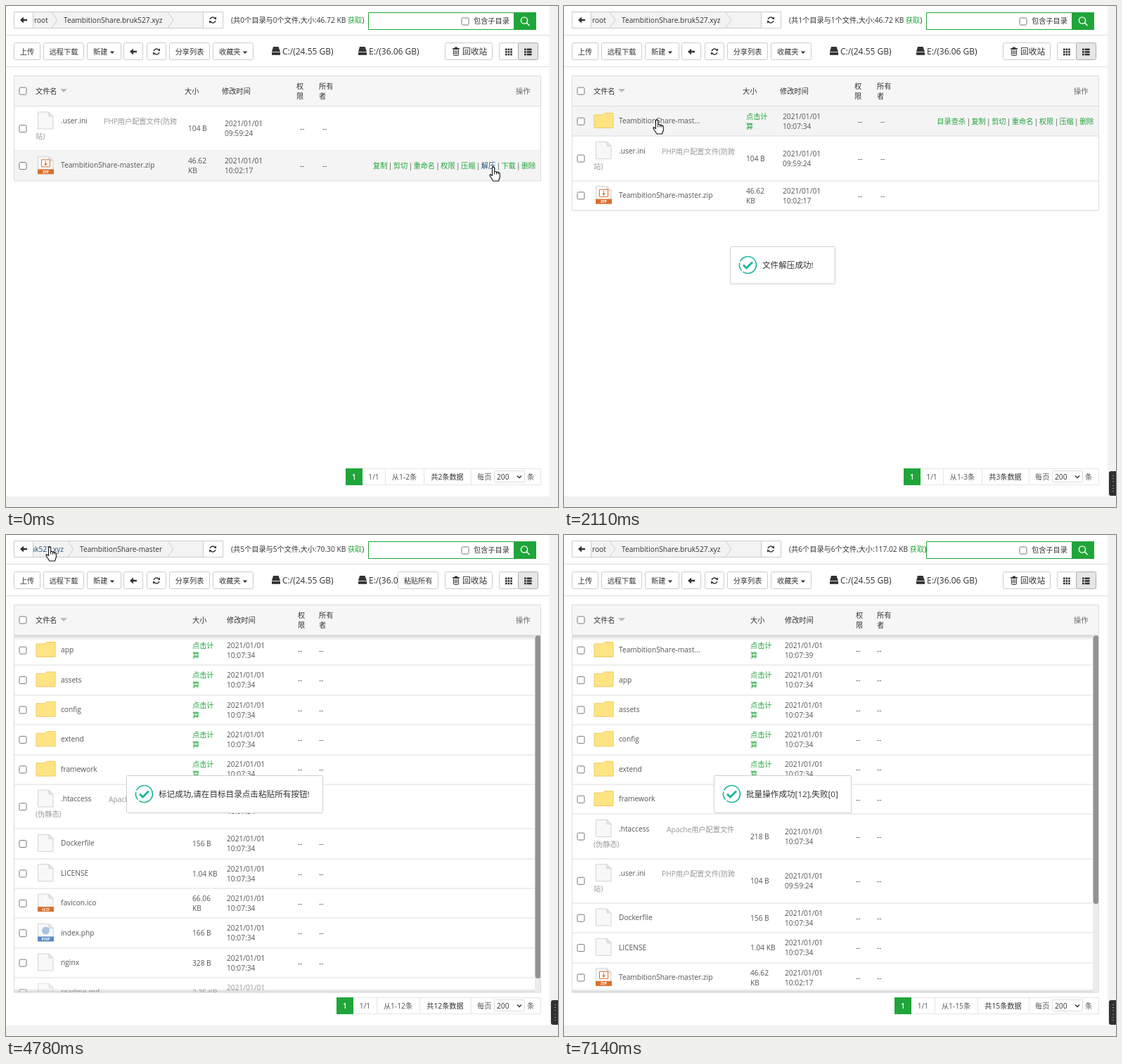
Recreate the animation shown at these times as an HTML page with a canvas. Size 785 px wide and 713 px high, loop 7.7 s.

```html
<!DOCTYPE html>
<html lang="zh">
<head>
<meta charset="utf-8">
<title>File manager</title>
<style>
html, body { margin: 0; width: 100%; height: 100%; overflow: hidden; background: #fff; }
canvas { display: block; width: 785px; height: 713px; }
</style>
</head>
<body>
<canvas id="stage" width="785" height="713"></canvas>
<script>
const ctx = document.getElementById('stage').getContext('2d');
const LOOP = 7700;
const GREEN = '#20a53a', TEXT = '#555', DARK = '#333', LINE = '#ddd';
const SITE = 'TeambitionShare.bruk527.xyz', PROJECT = 'TeambitionShare-master';

// ---- primitives ----
function text(s, x, y, color = TEXT, size = 10.2, align = 'left', weight = '') {
  ctx.font = `${weight} ${size}px "Open Sans", "Noto Sans CJK SC", "Noto Sans CJK", sans-serif`;
  ctx.textAlign = align;
  ctx.fillStyle = color;
  ctx.fillText(s, x, y + size * 0.36);
}
function rect(x, y, w, h, color) {
  ctx.fillStyle = color;
  ctx.fillRect(x, y, w, h);
}
function box(x, y, w, h, fill = '#fff', border = '#ccc', radius = 2) {
  ctx.beginPath();
  ctx.roundRect(x + 0.5, y + 0.5, w - 1, h - 1, radius);
  if (fill) { ctx.fillStyle = fill; ctx.fill(); }
  ctx.strokeStyle = border;
  ctx.lineWidth = 1;
  ctx.stroke();
}
function path(points, { fill, stroke, width = 1, close = false }) {
  ctx.beginPath();
  points.forEach(([x, y], i) => i ? ctx.lineTo(x, y) : ctx.moveTo(x, y));
  if (close || fill) ctx.closePath();
  if (fill) { ctx.fillStyle = fill; ctx.fill(); }
  if (stroke) { ctx.strokeStyle = stroke; ctx.lineWidth = width; ctx.stroke(); }
}
function arc(x, y, r, from, to, color, width) {
  ctx.beginPath();
  ctx.arc(x, y, r, from, to);
  ctx.strokeStyle = color;
  ctx.lineWidth = width;
  ctx.stroke();
}
function at(x, y, draw) {
  ctx.save();
  ctx.translate(x, y);
  draw();
  ctx.restore();
}

// ---- icons ----
const backArrow = (x, y) => at(x, y, () => {
  path([[-5, 0], [0, -4.5], [0, -1.3], [5, -1.3], [5, 1.3], [0, 1.3], [0, 4.5]], { fill: DARK });
});
const refresh = (x, y) => at(x, y, () => {
  for (let i = 0; i < 2; i++) {
    arc(0, 0, 4, 0.25, 2.5, DARK, 1.4);
    path([[-5, 0.5], [-5, 4.5], [-1.2, 2.2]], { fill: DARK });
    ctx.rotate(Math.PI);
  }
});
const caret = (x, y) => path([[x - 3.2, y - 1.5], [x + 3.2, y - 1.5], [x, y + 2]], { fill: DARK });
const disk = (x, y) => {
  path([[x + 2, y - 7], [x + 9.5, y - 7], [x + 12, y], [x, y]], { fill: DARK });
  rect(x, y + 0.8, 12, 4, DARK);
};
const trash = (x, y) => {
  rect(x - 5, y - 5, 10, 1.5, DARK);
  rect(x - 2, y - 6.5, 4, 1.5, DARK);
  box(x - 4, y - 4, 8, 10, null, DARK, 1);
  for (const dx of [-1.7, 0, 1.7]) rect(x + dx - 0.4, y - 2, 0.8, 6, DARK);
};
function checkbox(x, y, on) {
  box(x - 5.5, y - 5.5, 11, 11, on ? '#0b70d8' : '#fff', on ? '#0b70d8' : '#777', 1.5);
  if (on) path([[x - 3, y], [x - 1, y + 2.3], [x + 3, y - 2.6]], { stroke: '#fff', width: 1.5 });
}
function folder(y) {
  path([[43, y - 8], [55, y - 8], [57.5, y - 10.5], [70, y - 10.5], [70, y + 10.5], [43, y + 10.5]],
    { fill: '#ffe484', stroke: '#eccb62' });
}
function sheet(y, label, color) {
  path([[45.5, y - 12], [61, y - 12], [67, y - 6], [67, y + 12], [45.5, y + 12]],
    { fill: '#f8f8f8', stroke: '#d3d3d3' });
  path([[61, y - 12], [61, y - 6], [67, y - 6]], { fill: '#e6e6e6', stroke: '#d3d3d3' });
  if (!label) return;
  rect(45, y + 6, 23, 7, color);
  text(label, 56.5, y + 9.5, '#fff', 6, 'center', 'bold');
  if (label === 'ZIP') {
    box(50, y - 8, 13, 11, '#fff', color, 0);
    rect(56, y - 6, 1, 6, color);
    path([[54, y - 2], [59, y - 2], [56.5, y + 1]], { fill: color });
  } else if (label === 'ICO') {
    ctx.font = 'bold 15px "Noto Serif", serif';
    ctx.textAlign = 'center';
    ctx.fillText('i', 56.5, y + 2.5);
  } else {
    ctx.beginPath();
    ctx.arc(56.5, y - 2.5, 5.5, 0, 7);
    ctx.fillStyle = '#a9c4e2';
    ctx.fill();
  }
}
function fileIcon(kind, y) {
  if (kind === 'dir') folder(y);
  else if (kind === 'zip') sheet(y, 'ZIP', '#d9702d');
  else if (kind === 'ico') sheet(y, 'ICO', '#d9702d');
  else if (kind === 'php') sheet(y, 'PHP', '#5a8ac6');
  else sheet(y);
}

// ---- listings ----
const row = (kind, name, size = '', time = '10:07:34', note) => ({ kind, name, size, time, note });
const dirs = ['app', 'assets', 'config', 'extend', 'framework'].map(n => row('dir', n));
const userIni = row('file', '.user.ini', '104 B', '09:59:24', ['PHP用户配置文件(防跨', '站)', 139]);
const htaccess = row('file', '.htaccess', '218 B', '10:07:34', ['Apache用户配置文件', '(伪静态)', 146]);
const zip = row('zip', PROJECT + '.zip', '46.62 KB', '10:02:17');
const shared = [row('file', 'Dockerfile', '156 B'), row('file', 'LICENSE', '1.04 KB')];
const packed = time => row('dir', 'TeambitionShare-mast...', '', time);

const views = {
  start: { rows: [userIni, zip], info: [0, '46.72'], count: 2 },
  unpacked: { rows: [packed(), userIni, zip], info: [1, '46.72'], count: 3 },
  project: {
    rows: [...dirs, htaccess, ...shared, row('ico', 'favicon.ico', '66.06 KB'), row('php', 'index.php', '166 B'),
      row('file', 'nginx', '328 B'), row('file', 'readme.md', '2.35 KB')],
    info: [5, '70.30'], count: 12, long: true, inside: true, thumb: 488
  },
  merged: {
    rows: [packed('10:07:39'), ...dirs, htaccess, userIni, ...shared, zip],
    info: [6, '117.02'], count: 15, long: true, thumb: 382
  }
};
const rowHeight = r => r.note ? 63.3 : 42.4;

function actions(kind) {
  if (kind === 'dir') return '目录查杀 复制 剪切 重命名 权限 压缩 删除'.split(' ');
  const tail = { zip: '解压 下载', ico: '编辑 预览' }[kind] || '编辑 下载';
  return `${kind === 'php' ? '查杀 ' : ''}复制 剪切 重命名 权限 压缩 ${tail} 删除`.split(' ');
}
function drawActions(kind, right, y, mouse) {
  let x = right;
  actions(kind).reverse().forEach((label, i) => {
    const w = label.length * 10.2;
    if (i) { text('|', x - 4.2, y, TEXT, 10.2, 'center'); x -= 8.3; }
    const over = mouse && mouse.x > x - w && mouse.x < x && Math.abs(mouse.y - y) < 8;
    text(label, x, y, over ? '#23527c' : GREEN, 10.2, 'right');
    x -= w;
  });
}

// ---- timeline ----
const stops = [ // time, x, y of the pointer tip
  [0, 693, 229], [380, 693, 229], [1000, 476, 448], [1420, 476, 448], [2050, 132, 162], [2560, 132, 162],
  [3200, 24, 121], [3340, 24, 121], [3610, 519, 112], [3880, 514, 62], [4200, 514, 62], [4740, 62, 17],
  [5060, 62, 17], [5750, 586, 62], [6400, 586, 62], [6650, 574.5, 378.5], [6740, 574.5, 378.5], [7100, 610, 735]
];
function pointer(t) {
  const i = stops.findIndex(s => s[0] > t);
  if (i < 0) return { x: 610, y: 735 };
  const [t0, x0, y0] = stops[i - 1], [t1, x1, y1] = stops[i];
  const u = (t - t0) / (t1 - t0), k = u * u * (3 - 2 * u);
  return { x: x0 + (x1 - x0) * k, y: y0 + (y1 - y0) * k };
}
const ramp = (t, from, to, d) => Math.max(0, Math.min(1, (t - from) / d, (to - t) / d));
const within = (t, from, to) => t >= from && t < to;
const shades = [[430, 1500], [4210, 4400], [6420, 6880]];
const notices = [
  { from: 1200, to: 1480, label: '正在解压,请稍候...', w: 154, busy: true },
  { from: 1520, to: 4210, label: '文件解压成功!', w: 150 },
  { from: 4390, to: 6420, label: '标记成功,请在目标目录点击粘贴所有按钮!', w: 280 },
  { from: 6510, to: 6860, label: '正在处理,请稍候...', w: 156, busy: true },
  { from: 6900, to: 9000, label: '批量操作成功[12],失败[0]', w: 196 }
];
function viewAt(t) {
  if (t < 1490) return views.start;
  if (t < 2580) return views.unpacked;
  if (t < 5080) return views.project;
  return t < 6880 ? views.unpacked : views.merged;
}

// ---- page parts ----
function chevron(x) {
  path([[x, 9], [x + 8, 20], [x, 31]], { stroke: '#ccc' });
}
function drawTop(view, mouse) {
  box(11, 8, 298, 24, '#fff', '#ccc', 0);
  rect(39, 9, 241, 22, '#f3f3f3');
  rect(38, 9, 1, 22, '#ccc');
  rect(280, 9, 1, 22, '#ccc');
  backArrow(25, 20);
  refresh(294, 20);
  ctx.save();
  ctx.beginPath();
  ctx.rect(39, 9, 241, 22);
  ctx.clip();
  const over = mouse && mouse.y < 31 && mouse.x > 38 && mouse.x < 86;
  const first = over ? '#23527c' : DARK;
  if (view.inside) {
    text(SITE, 82, 20, first, 10.2, 'right');
    text(PROJECT, 105, 20, DARK);
    chevron(88);
  } else {
    text('root', 40, 20, first);
    text(SITE, 82, 20, DARK);
    chevron(65);
  }
  chevron(230);
  ctx.restore();

  const [n, size] = view.info;
  const info = `(共${n}个目录与${n}个文件,大小:${size} KB `;
  text(info, 320, 20, DARK);
  const end = 320 + ctx.measureText(info).width;
  text('获取', end, 20, GREEN);
  text(')', end + 20.4, 20, DARK);

  box(515, 9, 208, 25, '#fff', GREEN, 0);
  checkbox(653, 22);
  text('包含子目录', 665, 21, DARK);
  rect(722, 9, 32, 25, GREEN);
  arc(737, 20.5, 4.6, 0, 7, '#fff', 1.4);
  path([[740.3, 23.8], [744.5, 28]], { stroke: '#fff', width: 1.5 });
  rect(0, 41, 773, 1, LINE);
  rect(0, 86, 773, 1, LINE);
}
function button(x, w, label, active) {
  box(x, 52, w, 25, active ? '#e6e6e6' : '#fff', active ? '#adadad' : '#ccc');
  if (label) text(label, x + w / 2, 65, DARK, 10.2, 'center');
}
function drawToolbar(t) {
  button(11, 38, '上传');
  button(53, 58, '远程下载');
  button(115, 49);
  text('新建', 124, 65, DARK);
  caret(151, 66);
  button(167, 28);
  backArrow(181, 65);
  button(200, 28);
  refresh(214, 65);
  button(232, 58, '分享列表');
  button(294, 58);
  text('收藏夹', 303, 65, DARK);
  caret(340, 66);
  disk(378, 65);
  text('C:/(24.55 GB)', 393, 65, DARK, 12);
  disk(501, 65);
  text('E:/(36.06 GB)', 516, 65, DARK, 12);
  if (within(t, 3340, 4390)) {
    rect(453, 50, 163, 30, '#fff');
    ['复制', '剪切', '压缩', '删除'].forEach((s, i) => button(453 + i * 41.33 | 0, 38, s));
  } else if (within(t, 4390, 6880)) {
    rect(557, 50, 59, 30, '#fff');
    button(557, 58, '粘贴所有', t > 6380);
  }
  button(624, 68);
  trash(640, 65);
  text('回收站', 649, 65, DARK, 11.8);
  button(701, 28);
  button(728, 29, '', true);
  for (let r = 0; r < 3; r++) {
    for (let c = 0; c < 3; c++) rect(710 + c * 3.6, 60.5 + r * 3.6, 2.6, 2.6, DARK);
    rect(737, 60.5 + r * 3.6, 2.6, 2.6, DARK);
    rect(740.6, 60.5 + r * 3.6, 7, 2.6, DARK);
  }
}
function drawRow(r, top, view, hovered, picked, mouse) {
  const h = rowHeight(r), mid = top + h / 2, cols = view.long ? [265, 314, 415, 445] : [259, 311, 418, 450];
  const nameY = top + 20.5;
  if (hovered || picked) rect(12, top, 748, h, '#f4f4f4');
  rect(12, Math.round(top + h) - 0.5, 748, 1, LINE);
  ctx.save();
  if (top > 620) ctx.globalAlpha = 0.6;
  checkbox(24, mid, picked);
  fileIcon(r.kind, nameY - 0.5);
  text(r.name, 78, nameY);
  if (r.note) {
    text(r.note[0], r.note[2], top + 21.5, '#999');
    text(r.note[1], 42, top + 42.5, '#999');
  }
  const size = r.size ? (r.size.length > 7 ? r.size.split(' ') : [r.size]) : ['点击计', '算'];
  size.forEach((s, i) => text(s, cols[0], mid + (size.length > 1 ? i * 14 - 7 : 0), r.size ? TEXT : GREEN));
  text('2021/01/01', cols[1], mid - 7);
  text(r.time, cols[1], mid + 7);
  text('--', cols[2], mid);
  text('--', cols[3], mid);
  if (hovered || picked) drawActions(r.kind, view.long ? 745.5 : 753.5, mid, mouse);
  ctx.restore();
}
function drawTable(view, picked, mouse) {
  const bottom = view.long ? 651 : 143 + view.rows.reduce((s, r) => s + rowHeight(r), 0);
  let hoverRow = null, top = 143;
  ctx.save();
  ctx.beginPath();
  ctx.rect(11, 143, 750, bottom - 143);
  ctx.clip();
  for (const r of view.rows) {
    const h = rowHeight(r);
    const over = mouse && mouse.y > top && mouse.y < Math.min(top + h, bottom) && mouse.x > 11 && mouse.x < 760;
    if (over) hoverRow = r;
    drawRow(r, top, view, over, picked, mouse);
    top += h;
  }
  if (view.long) {
    for (const [y0, y1] of [[143, 150], [651, 645]]) {
      const g = ctx.createLinearGradient(0, y0, 0, y1);
      g.addColorStop(0, 'rgba(0,0,0,.16)');
      g.addColorStop(1, 'rgba(0,0,0,0)');
      rect(12, Math.min(y0, y1), 748, Math.abs(y1 - y0), g);
    }
    rect(752, 143, 9, 508, '#ececec');
    ctx.beginPath();
    ctx.roundRect(752.5, 143, 8, view.thumb, 4);
    ctx.fillStyle = '#929292';
    ctx.fill();
  }
  ctx.restore();

  rect(11, 100, 750, 43, '#f6f6f6');
  rect(11, 142, 750, 1, LINE);
  box(11, 99, 750, Math.round(bottom) - 99 + 0.5, null, LINE, 0);
  checkbox(24, 121, picked);
  text('文件名', 42, 121, DARK);
  path([[77, 118], [87, 118], [82, 123]], { fill: '#bbb' });
  text('大小', view.long ? 265 : 254, 121, DARK);
  text('修改时间', view.long ? 314 : 307, 121, DARK);
  ['权限', '所有者'].forEach((s, i) => {
    const x = i ? 445 : view.long ? 415 : 413;
    text(s.slice(0, -1), x, 114, DARK);
    text(s.slice(-1), x, 128, DARK);
  });
  text('操作', 725, 121, '#666');
  return hoverRow;
}
function drawPager(view) {
  const n = view.count, edges = n > 9 ? [470, 494, 527, 588] : [483, 507, 539, 594];
  box(edges[0], 658, 761 - edges[0], 24, '#fff', '#e6e6e6', 0);
  for (const x of [...edges.slice(2), 661]) rect(x, 658, 1, 24, '#e6e6e6');
  rect(edges[0], 658, 24, 24, GREEN);
  const mid = i => (edges[i] + (edges[i + 1] || 661)) / 2;
  text('1', mid(0), 670, '#fff', 10.2, 'center', '600');
  text('1/1', mid(1), 670, TEXT, 10.2, 'center');
  text(`从1-${n}条`, mid(2), 670, TEXT, 10.2, 'center');
  text(`共${n}条数据`, mid(3), 670, DARK, 10.2, 'center');
  text('每页', 670, 670);
  box(694, 661, 44, 17, '#fff', LINE, 1);
  text('200', 698, 670, DARK);
  path([[727, 668.5], [730, 671.5], [733, 668.5]], { stroke: DARK, width: 1.4 });
  text('条', 741, 670);
}
function drawNotice({ from, to, label, w, busy }, t) {
  const x = 311 - w / 2, iconX = x + 25.5;
  ctx.save();
  ctx.globalAlpha = ramp(t, from, to, 80);
  box(x, 342, w, 54, '#fff', '#d0d0d0', 1);
  if (busy) {
    const head = 4 + Math.floor((t - from) / 83);
    for (let i = 0; i < 12; i++) at(iconX, 368.5, () => {
      const age = (head - i + 24) % 12;
      ctx.rotate(i * Math.PI / 6);
      const shade = Math.round(Math.min(195, 15 + age * 20));
      ctx.beginPath();
      ctx.roundRect(-1.3, -12.7, 2.6, 6.7, 1.2);
      ctx.fillStyle = `rgb(${shade},${shade},${shade})`;
      ctx.fill();
    });
  } else {
    arc(iconX, 368.5, 12, -2.7, 2.2, '#1cb99a', 1.6);
    arc(iconX, 368.5, 12, 2.4, 3.4, '#1cb99a', 1.6);
    path([[iconX - 6.5, 368.5], [iconX - 2, 373], [iconX + 6.5, 364.5]], { stroke: '#1cb99a', width: 3 });
  }
  text(label, x + 46, 369, DARK, 11.6);
  ctx.restore();
}
function drawSideTab() {
  ctx.beginPath();
  ctx.roundRect(775, 662, 16, 35, 3);
  ctx.fillStyle = '#303030';
  ctx.fill();
  for (const y of [668, 672, 676, 682, 686, 690]) rect(780, y, 2, 1, y % 8 ? '#888' : '#b5a44e');
}
function drawPointer({ x, y }, hand) {
  const style = { fill: '#fff', stroke: '#111', width: 1.1 };
  ctx.lineJoin = 'round';
  at(x, y, () => path(hand
    ? [[-1.5, 1], [0, -0.5], [1.7, 1], [1.7, 6.5], [4, 6.5], [4.8, 7.5], [7, 7.3], [7.8, 8.5], [9.2, 8.8],
      [9.5, 14], [7.5, 20], [0, 20], [-5, 12.5], [-4.5, 10.5], [-1.5, 12.5]]
    : [[0, 0], [0, 13.3], [3, 10.6], [5.2, 15.6], [7.4, 14.6], [5.2, 9.8], [9.2, 9.6]], style));
  if (hand) at(x, y, () => {
    for (const dx of [1.7, 4.5, 7]) path([[dx, 7], [dx, 10.5]], { stroke: '#111' });
  });
  ctx.lineJoin = 'miter';
}

function draw(t) {
  const view = viewAt(t), tip = pointer(t);
  const shade = Math.max(...shades.map(([a, b]) => ramp(t, a, b, 70)));
  const mouse = shade > 0 ? null : tip;
  rect(0, 0, 785, 713, '#f1f1f1');
  rect(0, 0, 773, 698, '#fff');
  drawTop(view, mouse);
  drawToolbar(t);
  const hoverRow = drawTable(view, within(t, 3340, 4390), mouse);
  drawPager(view);
  if (shade > 0) rect(0, 0, 785, 713, `rgba(0,0,0,${0.3 * shade})`);
  for (const n of notices) if (within(t, n.from, n.to)) drawNotice(n, t);
  if (t > 430) drawSideTab();

  const onLink = hoverRow && (within(tip.x, 78, 195) || tip.x > 523);
  const onBar = tip.y < 32 && tip.x < 308 || within(tip.y, 52, 78) && (tip.x < 352 || tip.x > 453);
  drawPointer(tip, mouse && (onLink || onBar));
}

const begin = performance.now();
function tick() {
  draw((performance.now() - begin) % LOOP);
  requestAnimationFrame(tick);
}
tick();
</script>
</body>
</html>
```
